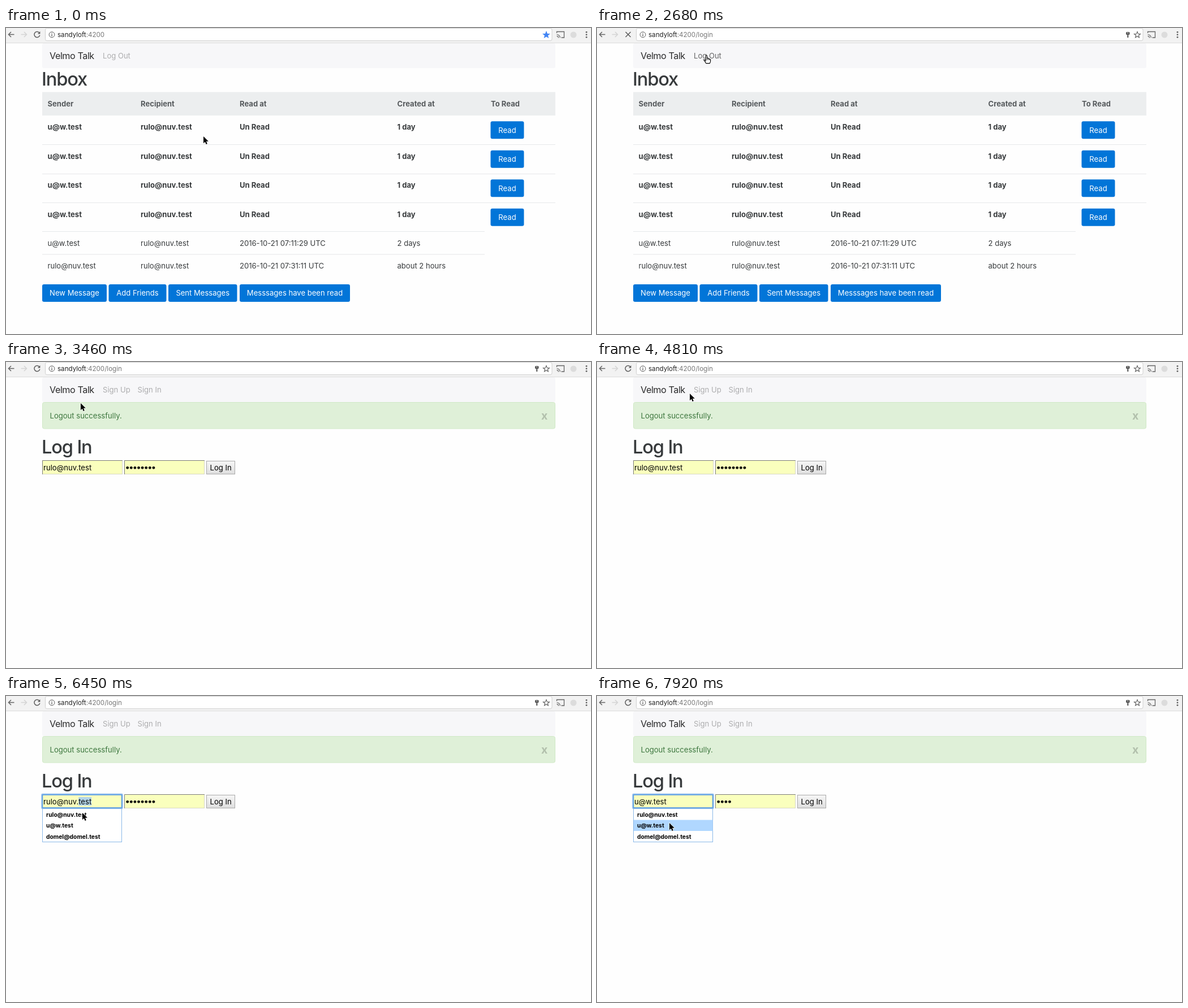
Animation of 1034x542 px, one loop 8 s. Source, as an HTML page:

```html
<!DOCTYPE html>
<html lang="en">
<head>
<meta charset="utf-8">
<title>Inbox</title>
<style>
  html, body { margin: 0; width: 100%; height: 100%; overflow: hidden; background: #fefefe; }
  svg { display: block; width: 1034px; height: 542px; }
  text { font: 400 13.07px Inter, sans-serif; fill: #373a3c; white-space: pre; }
  .bold { font-weight: 700; }
  .head { font-weight: 700; fill: #55595c; }
  .title { font-size: 32.7px; font-weight: 500; letter-spacing: -1.2px; }
  .brand { font-size: 16.2px; letter-spacing: -.45px; fill: #2b2b2c; }
  .link { fill: rgba(0, 0, 0, .3); }
  .link.hover { fill: rgba(0, 0, 0, .6); }
  .white { fill: #fff; text-anchor: middle; }
  .black { fill: #000; }
  .url { font-size: 11.6px; fill: #222; }
  .url tspan { fill: #777; }
  .ok { fill: #3c763d; }
  .close { font-size: 19.6px; font-weight: 700; fill: rgba(0, 0, 0, .2); }
  .option { font-size: 10.3px; font-weight: 700; fill: #000; }
</style>
</head>
<body>
<svg id="stage" viewBox="0 0 1034 542" xmlns="http://www.w3.org/2000/svg">
  <defs>
    <linearGradient id="grey" x2="0" y2="1">
      <stop stop-color="#f6f6f6"/><stop offset="1" stop-color="#dedede"/>
    </linearGradient>
  </defs>
</svg>
<script>
const stage = document.getElementById('stage');
const LOOP = 8000;
const USERS = ['rulo@nuv.test', 'u@w.test', 'domel@domel.test'];
const DOTS = [8, 4, 8];

function add(parent, tag, attrs, content) {
  const el = document.createElementNS(stage.namespaceURI, tag);
  for (const key in attrs) el.setAttribute(key, attrs[key]);
  if (content !== undefined) el.textContent = content;
  parent.append(el);
  return el;
}
const group = (parent = stage) => add(parent, 'g', {});
const rect = (g, x, y, width, height, fill, more) =>
  add(g, 'rect', { x, y, width, height, fill, ...more });
const label = (g, x, y, text, cls = '') => add(g, 'text', { x, y, class: cls }, text);
const line = (g, d, stroke, width = 1.5, fill = 'none') =>
  add(g, 'path', { d, stroke, 'stroke-width': width, fill });
const dot = (g, cx, cy, r, fill) => add(g, 'circle', { cx, cy, r, fill });
const show = (el, on) => { el.style.display = on ? '' : 'none'; };

// Browser bar
const bar = group();
rect(bar, 0, 0, 1034, 26, '#f2f2f2');
rect(bar, 0, 26, 1034, 1, '#dcdcdc');
rect(bar, 69.5, .5, 895.5, 22, '#fff', { rx: 3, stroke: '#cfcfcf' });
line(bar, 'M14.5 11.5H4.5M9 7l-4.5 4.5L9 16', '#666');
line(bar, 'M26.5 11.5H36.5M32 7l4.5 4.5L32 16', '#d4d4d4');
const reload = group(bar);
line(reload, 'M59 8.6A5 5 0 1 0 59.8 12.8', '#5c5c5c');
line(reload, 'M60.4 6V10.6H55.8Z', 'none', 0, '#5c5c5c');
const stop = line(bar, 'M50.5 7l9 9M59.5 7l-9 9', '#5c5c5c');
dot(bar, 81, 11.8, 4.9, 'none').setAttribute('stroke', '#5c5c5c');
rect(bar, 80.4, 11, 1.3, 3.7, '#5c5c5c');
rect(bar, 80.4, 8.8, 1.3, 1.3, '#5c5c5c');
const url = label(bar, 91, 16, 'sandyloft', 'url');
const path = add(url, 'tspan', {});

const key = group(bar);
rect(key, 935, 7, 6.6, 5, '#5c5c5c', { rx: 1.6 });
rect(key, 937.2, 11, 2.2, 6, '#5c5c5c');
rect(key, 937.6, 8, 1.4, 1.2, '#fff');
let points = '';
for (let i = 0; i < 10; i++) {
  const a = Math.PI * (i / 5 - .5), r = i % 2 ? 2.5 : 5.8;
  points += `${955 + r * Math.cos(a)},${12.2 + r * Math.sin(a)} `;
}
const star = add(bar, 'polygon', { points, 'stroke-width': 1.1 });
line(bar, 'M973.5 9V6.5H986.5V17H981.5', '#666', 1.3);
line(bar, 'M973.5 11.5a5.8 5.8 0 0 1 5.8 5.8M973.5 14.4a3 3 0 0 1 3 3', '#666', 1.2);
dot(bar, 1003, 12, 5.5, '#dcdcdc');
for (let i = 0; i < 3; i++) dot(bar, 1026, 7.3 + i * 4.5, 1.4, '#5c5c5c');

// Shared page header
rect(stage, 64, 27, 907, 44, '#f7f7f9', { rx: 3 });
label(stage, 77, 55, 'Velmo Talk', 'brand');

// Inbox page
const inbox = group();
const COLS = [73.5, 238, 413, 691.5, 857];
const logOut = label(inbox, 171, 54, 'Log Out', 'link');
label(inbox, 63, 101.6, 'Inbox', 'title');
rect(inbox, 64, 113.5, 907, 41.5, '#eceeef');

function row(mid, cells, cls) {
  cells.forEach((text, i) => label(inbox, COLS[i], mid + 4.8, text, cls));
}
function button(x, y, width, text) {
  rect(inbox, x, y, width, 31, '#0275d8', { rx: 3.2 });
  label(inbox, x + width / 2, y + 20.3, text, 'white');
}
row(134.2, ['Sender', 'Recipient', 'Read at', 'Created at', 'To Read'], 'head');
for (let i = 0; i < 4; i++) {
  const top = 155 + i * 51.5;
  if (i) rect(inbox, 64, Math.floor(top), 907, 1, '#e6e8ea');
  row(top + 20.2, [USERS[1], USERS[0], 'Un Read', '1 day'], 'bold');
  button(856.5, top + 10.2, 59, 'Read');
}
rect(inbox, 64, 360, 782, 1, '#e6e8ea');
rect(inbox, 64, 400.5, 782, 1, '#e6e8ea');
row(381, [USERS[1], USERS[0], '2016-10-21 07:11:29 UTC', '2 days']);
row(421.2, [USERS[0], USERS[0], '2016-10-21 07:31:11 UTC', 'about 2 hours']);
button(64, 454, 114, 'New Message');
button(181.5, 454, 102, 'Add Friends');
button(287, 454, 121.5, 'Sent Messages');
button(413, 454, 195, 'Messsages have been read');

// Login page
const login = group();
const signUp = label(login, 171, 54, 'Sign Up', 'link');
label(login, 232.5, 54, 'Sign In', 'link');
rect(login, 64.5, 71.5, 906, 46.5, '#dff0d8', { rx: 3, stroke: '#d0e9c6' });
label(login, 77.5, 100, 'Logout successfully.', 'ok');
label(login, 946, 102.2, 'x', 'close');
label(login, 63, 162.3, 'Log In', 'title');

function field(x) {
  rect(login, x + .5, 174.5, 141, 24, '#faffbd', { stroke: '#d8d8c4' });
  line(login, `M${x + .5} 199V174.5H${x + 142}`, '#7c7c78', 1);
}
field(64);
field(209);
rect(login, 354.5, 175.5, 50, 23, 'url(#grey)', { stroke: '#a9a9a9' });
label(login, 360.5, 191.8, 'Log In', 'black');

const ring = group(login);
rect(ring, 63.5, 174, 142, 25, 'none', { rx: 1.5, stroke: '#a6cbf2', 'stroke-width': 3 });
rect(ring, 64.5, 175, 140, 23, 'none', { stroke: '#4f95e0', 'stroke-width': 1.5 });
const picked = rect(login, 126, 179, 26, 15, '#b3d5e8');
const user = label(login, 66, 191.8, '', 'black');
const dots = [];
for (let i = 0; i < 8; i++) dots.push(dot(login, 214.7 + i * 6.6, 187.3, 2.4, '#000'));

const menu = group(login);
rect(menu, 64.5, 199.5, 140, 59, '#fff', { stroke: '#8bb9e8' });
const glow = rect(menu, 65, 0, 139.5, 19.5, '#b0d7ff');
USERS.forEach((name, i) => label(menu, 71, 213.8 + i * 19.6, name, 'option'));

// Pointers, drawn with the hot spot at 0,0
const cursor = group();
const shapes = { arrow: group(cursor), hand: group(cursor), beam: group(cursor) };
add(shapes.arrow, 'path', {
  d: 'M0 0V12.2L2.8 9.6 4.7 14 6.8 13.1 4.9 8.8H8.8Z',
  fill: '#000', stroke: '#fff', 'stroke-width': 1.2, 'paint-order': 'stroke'
});
add(shapes.hand, 'path', {
  d: 'M-1.9 3.6V-5.4Q-1.8-6.7-.7-6.7T.5-5.4V-1.6Q2.6-2.4 2.9-.8 4.6-1.3 5 .2 6.6 0 6.6 1.6'
    + 'V4Q6.4 5.6 5.3 7.6H-1.3Q-2.3 5.3-4.7 2.7-5.2 1.2-3.8 1.2-2.8 1.5-1.9 3Z',
  fill: '#fff', stroke: '#000', 'stroke-width': 1.1, 'stroke-linejoin': 'round'
});
line(shapes.hand, 'M.5-1.6V1.8M2.9-.8V1.8M5 .2V2', '#000', .9);
line(shapes.beam, 'M-2.5-7.5Q0-7.5 0-6V6Q0 7.5-2.5 7.5M2.5-7.5Q0-7.5 0-6M0 6Q0 7.5 2.5 7.5', '#333', 1);

// time, x, y, pointer, link under the pointer
const moves = [
  [0, 349, 192, 'arrow'],
  [140, 392, 184, 'arrow'], [290, 447, 152, 'arrow'], [440, 392, 96, 'arrow'],
  [590, 300, 76, 'arrow'], [740, 212, 98, 'arrow'], [910, 190, 160, 'arrow'],
  [1060, 216, 208, 'arrow'], [1210, 206, 150, 'arrow'], [1360, 193, 84, 'arrow'],
  [1510, 188, 48, 'arrow'], [1660, 188, 49, 'arrow'], [1800, 188, 50, 'arrow'],
  [2090, 192, 55, 'hand', 1], [2240, 194, 55, 'hand', 1],
  [2830, 194, 55, 'hand'], [3130, 194, 55, 'hand', 1],
  [3280, 160, 66, 'arrow'], [3460, 132, 73, 'arrow'],
  [4810, 164, 56, 'arrow'], [4960, 204, 51, 'hand', 1], [5110, 246, 82, 'arrow'],
  [5260, 222, 138, 'arrow'], [5410, 160, 206, 'arrow'], [5550, 134, 187, 'beam'],
  [6450, 135, 207, 'arrow'], [6600, 135, 211, 'arrow'], [6750, 134, 226, 'arrow'],
  [6900, 132, 242, 'arrow'], [7050, 130, 233, 'arrow'], [7180, 129, 224, 'arrow'],
  [7630, 130, 224, 'arrow'], [7780, 129, 224, 'arrow'], [7920, 128, 225, 'arrow']
];
// time, highlighted option (-1 for none)
const picks = [[0, -1], [6600, 0], [6750, 1], [6900, 2], [7050, 1]];

const at = (table, t) => table.findLast(step => step[0] <= t);

function render(t) {
  const [, x, y, kind, hover] = at(moves, t);
  const pick = at(picks, t)[1];
  const onLogin = t >= 2830, newUrl = t >= 2680, loading = t >= 2540 && !onLogin;
  const focus = t >= 5850;

  show(inbox, !onLogin);
  show(login, onLogin);
  show(reload, !loading);
  show(stop, loading);
  show(key, newUrl);
  path.textContent = newUrl ? ':4200/login' : ':4200';
  star.setAttribute('fill', newUrl ? 'none' : '#4285f4');
  star.setAttribute('stroke', newUrl ? '#5c5c5c' : '#4285f4');
  logOut.classList.toggle('hover', !!hover);
  signUp.classList.toggle('hover', !!hover);

  const who = Math.max(pick, 0);
  if (user.textContent !== USERS[who]) user.textContent = USERS[who];
  dots.forEach((el, i) => show(el, i < DOTS[who]));
  show(ring, focus);
  show(menu, focus);
  show(glow, pick >= 0);
  glow.setAttribute('y', 200 + who * 19.5);
  const selected = t >= 6000 && pick < 0;
  show(picked, selected);
  if (selected) {
    const from = USERS[0].indexOf('.') + 1;
    picked.setAttribute('x', user.getStartPositionOfChar(from).x);
    picked.setAttribute('width', user.getSubStringLength(from, USERS[0].length - from));
  }

  for (const name in shapes) show(shapes[name], name === kind);
  cursor.setAttribute('transform', `translate(${x} ${y})`);
}

function tick() {
  render(performance.now() % LOOP);
  requestAnimationFrame(tick);
}
tick();
</script>
</body>
</html>
```
